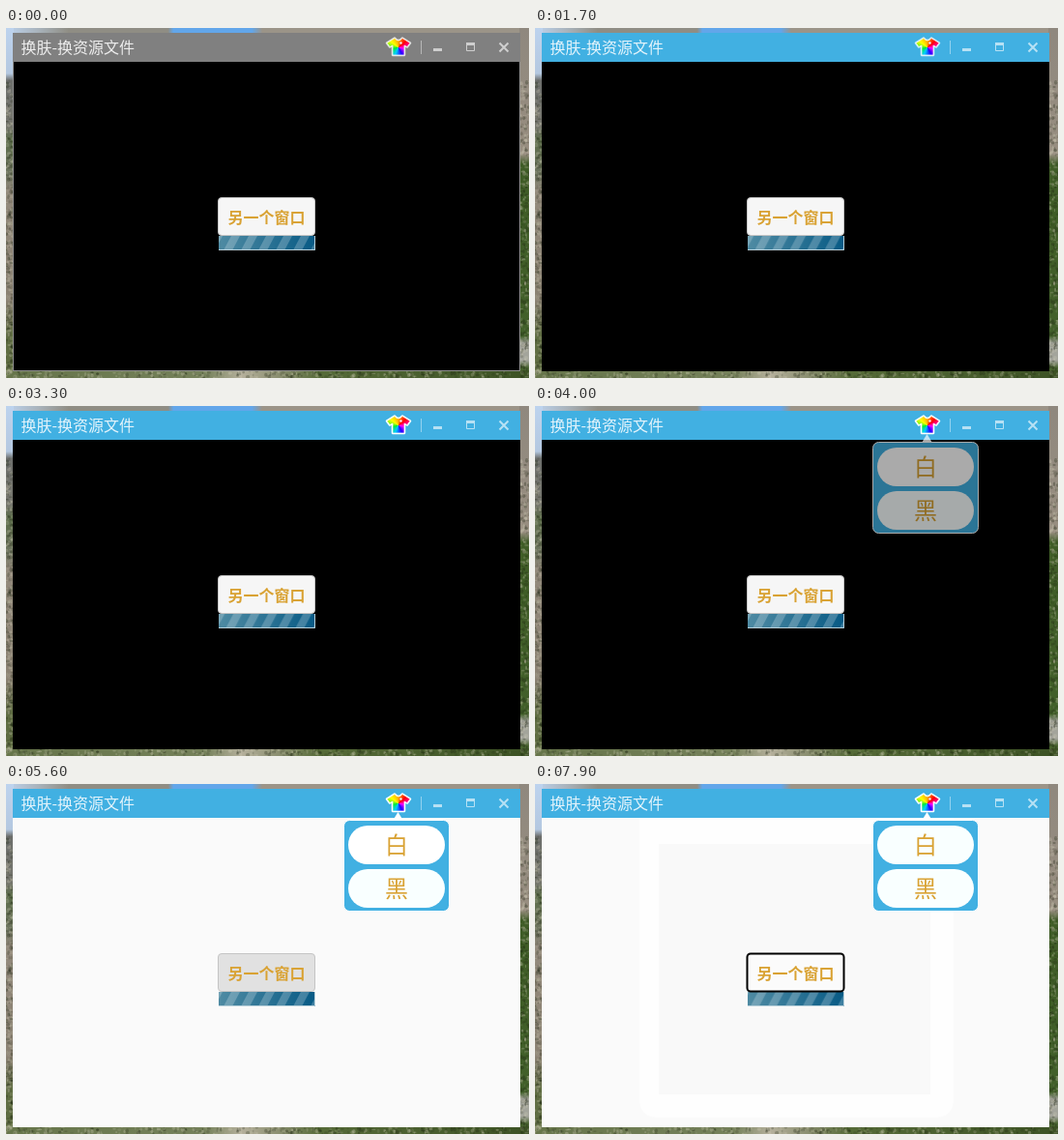
Recreate the animation shown at these times as an HTML page. Size 541x362 px, loop 8000 ms.

```html
<!DOCTYPE html>
<html lang="zh-CN">
<head>
<meta charset="utf-8">
<style>
html, body { margin: 0; width: 100%; height: 100%; overflow: hidden; background: #8d8578; }
svg { display: block; }
text { font-family: "Noto Sans CJK SC", "Noto Sans CJK", sans-serif; }
.gold { fill: #d9a233; text-anchor: middle; }
.rainbow { width: 24px; height: 20px; background: conic-gradient(from 50deg, red, #f0f, #20f, #0cf, #0e3, #ff0, #fa0, red); }
#dialog { transform-origin: 269px 177px; filter: drop-shadow(0 1px 7px rgba(0, 0, 0, .35)); }
#dialog text { font-family: "Open Sans", "Noto Sans", sans-serif; font-size: 12px; }
</style>
</head>
<body>
<svg width="541" height="362" viewBox="0 0 541 362">
  <defs>
    <linearGradient id="blue"><stop stop-color="#4f8ba3"/><stop offset="1" stop-color="#075a85"/></linearGradient>
    <linearGradient id="topSide">
      <stop stop-color="#bdd3ee"/><stop offset=".06" stop-color="#a9b4bd"/><stop offset=".12" stop-color="#8f8d84"/>
      <stop offset=".31" stop-color="#8f8d84"/><stop offset=".32" stop-color="#62a6ea"/><stop offset=".47" stop-color="#62a6ea"/>
      <stop offset=".49" stop-color="#9b9488"/><stop offset="1" stop-color="#9b9488"/>
    </linearGradient>
    <linearGradient id="leftSide" x2="0" y2="1">
      <stop stop-color="#bdd3ee"/><stop offset=".13" stop-color="#b4c8e0"/><stop offset=".15" stop-color="#6d6f6c"/>
      <stop offset=".28" stop-color="#77776f"/><stop offset=".32" stop-color="#5a6b48"/><stop offset=".42" stop-color="#6f7560"/>
      <stop offset=".46" stop-color="#938a7c"/><stop offset=".78" stop-color="#8a8172"/><stop offset=".88" stop-color="#5f6d42"/>
    </linearGradient>
    <linearGradient id="rightSide" x2="0" y2="1">
      <stop stop-color="#8f887e"/><stop offset=".36" stop-color="#988e80"/><stop offset=".39" stop-color="#3f5c26"/>
      <stop offset=".88" stop-color="#42602a"/><stop offset=".9" stop-color="#a3a49b"/><stop offset=".95" stop-color="#a3a49b"/>
      <stop offset=".97" stop-color="#48632f"/>
    </linearGradient>
    <linearGradient id="bottomSide">
      <stop stop-color="#66754a"/><stop offset=".38" stop-color="#75815a"/><stop offset=".45" stop-color="#b5b09c"/>
      <stop offset=".52" stop-color="#8b8f70"/><stop offset=".6" stop-color="#566b38"/><stop offset="1" stop-color="#3c5224"/>
    </linearGradient>
    <pattern id="stripes" width="18" height="15" y="215" patternUnits="userSpaceOnUse">
      <path d="M0 15 8 0h9L9 15ZM-18 15l8-15h9l-8 15Z" fill="#fff" fill-opacity=".22"/>
    </pattern>
    <clipPath id="shirtShape"><path id="shirtPath" d="M402 10.500q4 5 8 0l8 5-3 4-3-1.500V28h-12v-10L397 19.500l-3-4Z"/></clipPath>
  </defs>

  <path d="M0 0h541v6H0Z" fill="url(#topSide)"/>
  <path d="M0 0h8v362H0Z" fill="url(#leftSide)"/>
  <path d="M531 0h10v362h-10Z" fill="url(#rightSide)"/>
  <path d="M0 354h541v8H0Z" fill="url(#bottomSide)"/>
  <g id="texture"></g>

  <g id="main">
    <rect id="body" x="7" y="5" width="525" height="350"/>
    <g id="trace">
      <path d="M108 35H433V325q0 20-20 20H128q-20 0-20-20Z" fill="#fefefe"/>
      <path d="M128 62H409V321H128Z" fill="#f9f9f9"/>
    </g>
    <rect id="edge" x="7.500" y="5.500" width="524" height="349" fill="none" stroke="#8c8c8c"/>
    <rect id="bar" x="7" y="5" width="525" height="30"/>
    <text x="15.500" y="25.500" font-size="16" font-weight="300" fill="#fff" fill-opacity=".85">换肤-换资源文件</text>
    <use id="shirtEdge" href="#shirtPath" fill="none" stroke="#fff" stroke-width="2.500" stroke-linejoin="round"/>
    <g clip-path="url(#shirtShape)">
      <foreignObject x="394" y="10" width="24" height="20"><div class="rainbow"></div></foreignObject>
    </g>
    <use href="#shirtPath" fill="none" stroke="#fff" stroke-opacity=".7"/>
    <circle cx="408.500" cy="15.500" r="1.200" fill="#eee"/>
    <g fill="none" stroke="#fff" opacity=".62">
      <path d="M429.500 13v14" opacity=".7"/>
      <path d="M442 22.500h9" stroke-width="3"/>
      <path d="M476.500 18v5.500h8V18"/>
      <path d="M476 16.500h9" stroke-width="3"/>
      <path d="M510.500 15.500l9 9m0-9l-9 9" stroke-width="2"/>
    </g>

    <rect x="220" y="215" width="100" height="15" fill="url(#blue)"/>
    <rect x="220" y="215" width="100" height="15" fill="url(#stripes)"/>
    <path d="M220 229.500h99.500V215" fill="none" stroke="#b8d0da"/>
    <rect id="button" x="219.500" y="175.500" width="100" height="39" rx="3.500"/>
    <text class="gold" x="269.500" y="201.500" font-size="16" font-weight="700">另一个窗口</text>

    <g id="popup">
      <path d="M405.500 29l5.500 9h-11Z" fill="#fff"/>
      <rect x="349.500" y="37.500" width="109" height="94" rx="6" fill="#41b0e2" stroke="#fff"/>
      <rect id="white" x="354" y="43" width="100" height="40" rx="20"/>
      <rect x="354" y="88" width="100" height="40" rx="20" fill="#f9ffff"/>
      <text class="gold" x="404" y="72" font-size="24">白</text>
      <text class="gold" x="404" y="117" font-size="24">黑</text>
    </g>
  </g>

  <g id="dialog">
    <rect x="126.500" y="30.500" width="285" height="292" fill="#fafafa" stroke="#4d86b5"/>
    <path d="M350 61h61v70h-61ZM219 175h101v55H219Z" fill="#fdfefe"/>
    <path d="M127 31h284v30H127Z" fill="#2b79d0"/>
    <path id="close" d="M366 31h45v29h-45Z" fill="#e81123"/>
    <path d="M135 39h15v12h-15Z" fill="#eef2f2"/>
    <path d="M136 41h7v9h-7Z" fill="#4d8a80"/>
    <path d="M145 42h4m-4 3h4m-4 3h4" stroke="#9aa"/>
    <text x="156" y="49.500" fill="#fff">FormHue3</text>
    <path d="M292 45.500h10M337.500 40.500h9v9h-9ZM384 40.500l9 9m0-9l-9 9" fill="none" stroke="#fff"/>
    <text id="count" x="269" y="196" text-anchor="middle" fill="#bd8474"></text>
  </g>
</svg>
<script>
const $ = id => document.getElementById(id);
const set = (id, attrs) => Object.entries(attrs).forEach(([k, v]) => $(id).setAttribute(k, v));
const ramp = (t, from, to) => Math.min(1, Math.max(0, (t - from) / (to - from)));
const within = (t, from, to) => t >= from && t < to;

// Light and dark flecks that roughen the desktop rim
let seed = 7;
const rnd = () => (seed = seed * 16807 % 2147483647) / 2147483647;
function roughen() {
  let flecks = '';
  for (let i = 0; i < 900; i++) {
    const side = i % 3, along = rnd();
    const x = side === 0 ? along * 541 : side === 1 ? rnd() * 7 : 532 + rnd() * 9;
    const y = side === 0 ? 355 + rnd() * 7 : 55 + along * 307;
    flecks += `<ellipse cx="${x}" cy="${y}" rx="${.6 + rnd() * 1.6}" ry="${.6 + rnd() * 1.8}" fill="${rnd() < .5 ? '#1c2410' : '#d2cfb8'}" opacity="${.1 + rnd() * .25}"/>`;
  }
  $('texture').innerHTML = flecks;
}

function draw(t) {
  const active = within(t, 500, 5700) || t >= 7700;
  const light = t >= 4400, hover = within(t, 5300, 7400), focus = t >= 7700;
  set('bar', { fill: active ? '#41b0e2' : '#808080' });
  set('edge', { opacity: active ? 0 : 1 });
  set('body', { fill: light ? '#fafafa' : '#000' });
  set('trace', { opacity: t >= 7500 ? 1 : 0 });
  set('shirtEdge', { 'stroke-opacity': t >= 2500 ? 1 : .7 });
  set('stripes', { x: t / 800 % 1 * 18 + 9 });
  set('button', {
    fill: focus ? '#fbfbfb' : hover ? '#e1e1e1' : '#f6f6f6',
    stroke: focus ? '#000' : '#c4c4c4',
    'stroke-width': focus ? 2 : 1
  });
  set('popup', { opacity: ramp(t, 3500, 4250) });
  set('white', { fill: within(t, 4300, 4700) ? '#e1e1e1' : focus ? '#f9ffff' : '#fff' });

  const shown = ramp(t, 5700, 6000) * (1 - ramp(t, 7300, 7500));
  set('dialog', { opacity: shown });
  $('dialog').style.transform = `scale(${.9 + .1 * shown})`;
  set('close', { opacity: t >= 6600 ? 1 : 0 });
  $('count').textContent = 7 + Math.floor(t / 1000);
}

function tick() {
  draw(Math.floor(performance.now() % 8000 / 100) * 100);
  requestAnimationFrame(tick);
}
roughen();
tick();
</script>
</body>
</html>
```
